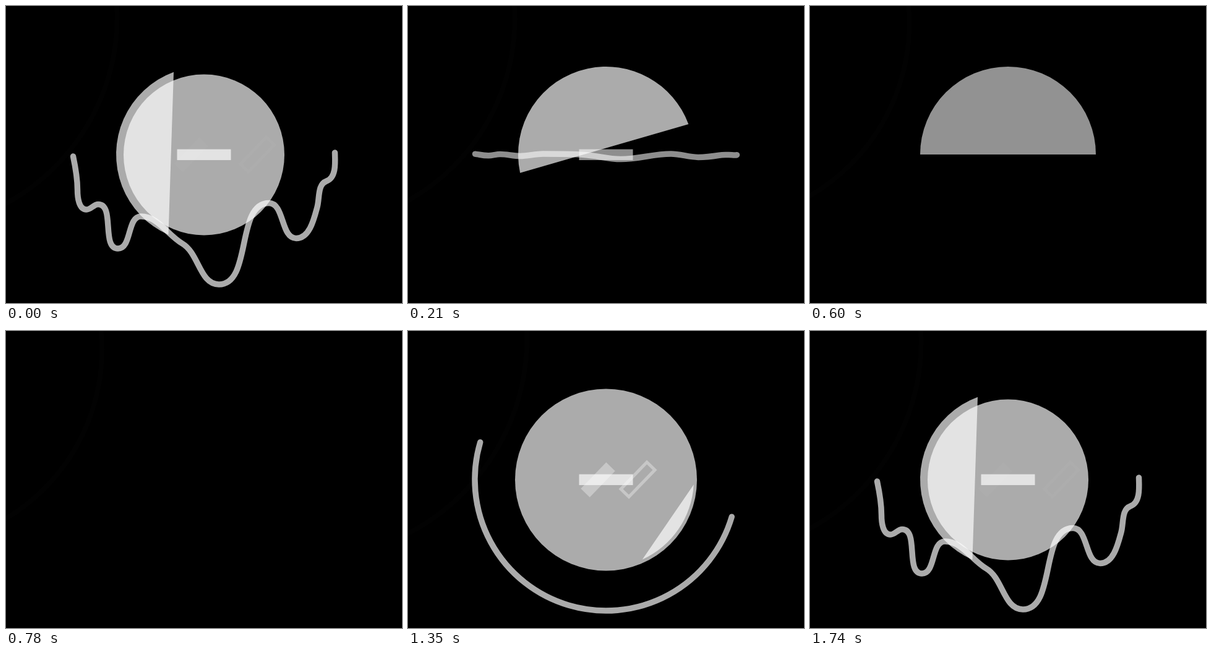
Animation of 640 by 480 pixels, one loop 1.77 s. Source, as an HTML page with a canvas:

```html
<!DOCTYPE html>
<html lang="en">
<head>
<meta charset="utf-8">
<title>Shape loop</title>
<style>
html, body { margin: 0; width: 100%; height: 100%; overflow: hidden; background: #000; }
canvas { display: block; }
</style>
</head>
<body>
<canvas id="stage" width="640" height="480"></canvas>
<script>
const ctx = document.getElementById('stage').getContext('2d');
const LOOP = 1770, STEP = 30, CX = 320, CY = 240, ARC = 212, TINT = 0.67;
// Motion begins at BEGIN; the loop point falls at SEAM, inside that motion
const BEGIN = 1200, SEAM = 1765, FINISH = 2565;

const rad = d => d * Math.PI / 180;
const mix = (a, b, k) => a + (b - a) * k;
const clamp = (v, lo, hi) => Math.min(hi, Math.max(lo, v));
const ramp = (t, from, to) => clamp((t - from) / (to - from), 0, 1);
const easeOut = k => 1 - (1 - k) ** 2;

function bounce(t) {
  const k = 7.5625, w = 2.75;
  if (t < 1 / w) return k * t * t;
  if (t < 2 / w) return k * (t - 1.5 / w) ** 2 + 0.75;
  if (t < 2.5 / w) return k * (t - 2.25 / w) ** 2 + 0.9375;
  return k * (t - 2.625 / w) ** 2 + 0.984375;
}

function paint(alpha) {
  ctx.fillStyle = ctx.strokeStyle = `rgba(255,255,255,${alpha})`;
}

function halo(t) {
  const r = mix(360, 318, ramp(t, BEGIN, FINISH));
  ctx.strokeStyle = '#020202';
  ctx.lineWidth = 8;
  ctx.beginPath();
  ctx.arc(-163, 30 - (r - 318) / 2, r, 0, 7);
  ctx.stroke();
}

function disc(t) {
  const grow = easeOut(ramp(t, 1170, 1350));
  const settle = 147 - 17 * easeOut(ramp(t, 1350, SEAM));
  const drop = 1 - ramp(t, SEAM, 1973) ** 1.5;
  paint(TINT);
  ctx.beginPath();
  ctx.arc(CX, CY + 0.5, settle * grow * drop, 0, 7);
  ctx.fill();
}

// A half circle whose two ends run round at different speeds
function segment(t) {
  const p = bounce(ramp(t, 1102, 2262));
  paint(TINT * (1 - ramp(t, 2355, FINISH)));
  ctx.beginPath();
  ctx.arc(CX, CY, 142, rad(270 * p - 90), rad(450 * p - 90));
  ctx.fill();
}

// Key points of the hanging line: x, y, slant in degrees, y when flattened
const LINE = [
  [108.5, 243, 78, 243.5], [115.5, 297, 90, 239], [130, 329, 0, 233],
  [149, 320.5, 0, 242], [181, 392, 0, 230], [218, 340, 0, 244],
  [285, 384, 30, 238], [344, 450, 0, 209], [425, 318.5, 0, 244],
  [469, 375.5, 0, 222], [503, 325, -75, 235], [518, 283, -20, 238],
  [531.5, 237, -92, 237]
];

function curve(pts) {
  ctx.beginPath();
  ctx.moveTo(pts[0][0], pts[0][1]);
  for (let i = 1; i < pts.length; i++) {
    const [x0, y0, a0] = pts[i - 1], [x1, y1, a1] = pts[i];
    const h = 0.35 * Math.hypot(x1 - x0, y1 - y0);
    ctx.bezierCurveTo(
      x0 + h * Math.cos(rad(a0)), y0 + h * Math.sin(rad(a0)),
      x1 - h * Math.cos(rad(a1)), y1 - h * Math.sin(rad(a1)), x1, y1);
  }
}

function sag(k) {
  curve(LINE.map(([x, y, slant]) => {
    const a = Math.acos((x - CX) / ARC);
    return [x, mix(CY + ARC * Math.sin(a), y, k), mix(a * 180 / Math.PI - 90, slant, k)];
  }));
}

function flatten(t) {
  const k = ramp(t, SEAM, 1875);
  const s = Math.max(0, t - 1875) / 100;
  const swing = Math.exp(-s) * Math.cos(s * Math.PI);
  curve(LINE.map(([x, y, slant, flat]) =>
    [x, mix(y, mix(CY, flat, swing), k), slant * mix(1, -0.5 * swing, k)]));
}

function line(t) {
  paint(TINT * (1 - ramp(t, 1965, 2145)));
  ctx.lineWidth = 9.5;
  ctx.lineCap = ctx.lineJoin = 'round';
  if (t <= 1560) {
    const turn = 53.5 * (1 - ramp(t, BEGIN, 1549)) ** 2 - 0.88;
    ctx.beginPath();
    ctx.arc(CX, CY, ARC, rad(turn), rad(180 + turn));
  } else if (t <= SEAM) {
    sag(ramp(t, 1560, SEAM) ** 2);
  } else {
    flatten(t);
  }
  ctx.stroke();
}

function bar(x, y, w, h, turn, border) {
  ctx.save();
  ctx.translate(x, y);
  ctx.rotate(rad(turn));
  if (border) {
    ctx.lineWidth = border;
    ctx.lineJoin = 'miter';
    ctx.strokeRect((border - w) / 2, (border - h) / 2, w - border, h - border);
  } else {
    ctx.fillRect(-w / 2, -h / 2, w, h);
  }
  ctx.restore();
}

function bars(t) {
  const near = Math.exp((1350 - t) / 160);
  paint(Math.min(TINT, near / 3) * (1 - ramp(t, SEAM, 1965)));
  bar(298.5 + 8.5 * near, 240.5, 59, 20, -46);
  bar(409 - 37.5 * near, 240, 65.5, 23, -46, 5);

  paint(TINT * ramp(t, 1170, 1260) * (1 - ramp(t, 1965, 2145)));
  bar(CX, 240.3, 87, 17.5, 2.6 * Math.sin(Math.PI * ramp(t, 1350, SEAM)));
}

function draw(now) {
  let t = Math.floor(now % LOOP / STEP) * STEP;
  if (t === 0 || t >= LOOP - STEP) t = SEAM;
  else if (t < BEGIN) t = Math.min(t + SEAM + 20, FINISH);
  ctx.fillStyle = '#000';
  ctx.fillRect(0, 0, 640, 480);
  for (const part of [halo, disc, segment, line, bars]) part(t);
}

const start = performance.now();
function loop() {
  draw(performance.now() - start);
  requestAnimationFrame(loop);
}
loop();
</script>
</body>
</html>
```
